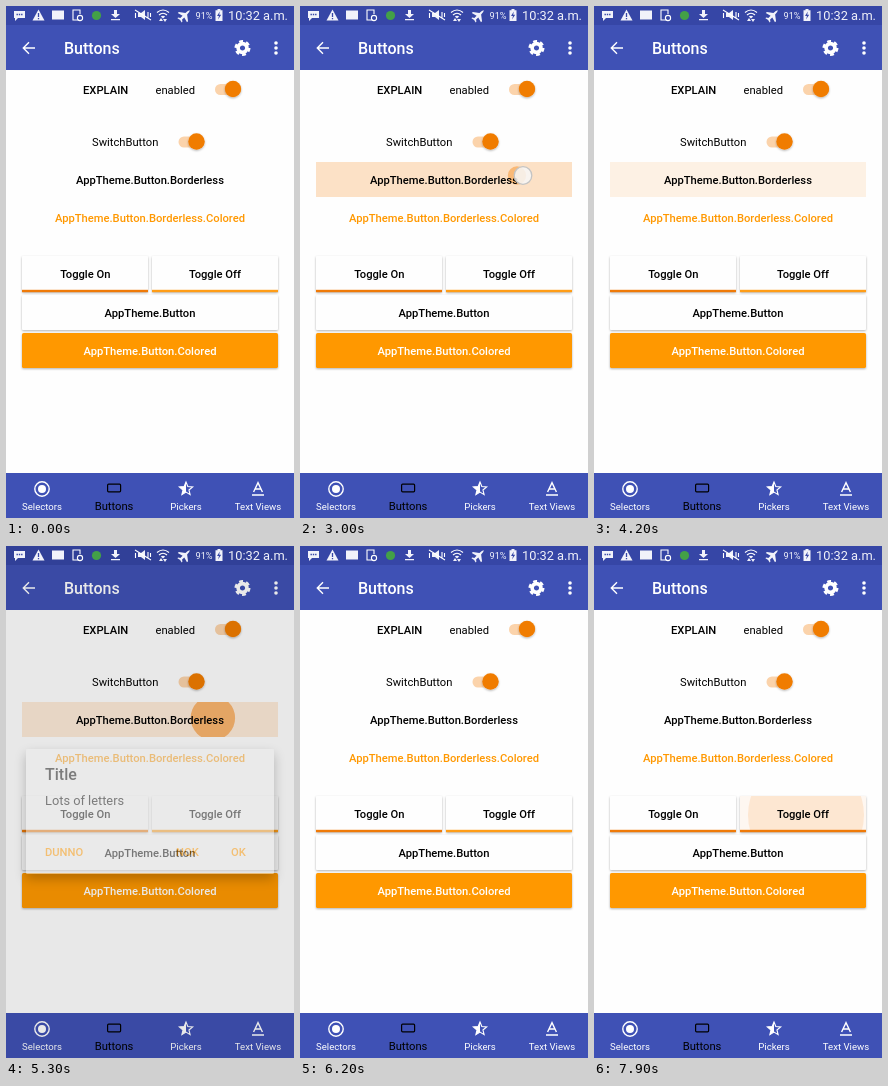
Write an HTML page that moves like this. It is 288 by 512 pixels and loops after 8000 ms.

```html
<!DOCTYPE html>
<html lang="en">
<head>
<meta charset="utf-8">
<title>Buttons</title>
<style>
html, body { margin: 0; width: 100%; height: 100%; overflow: hidden; background: #fefefe; }
svg { display: block; width: 288px; height: 512px; }
text { font: 11.2px Roboto, "Open Sans", sans-serif; }
.medium { font-weight: 500; }
.mid { text-anchor: middle; }
.title { font-size: 16px; font-weight: 500; }
.nav { font-size: 9.6px; fill: #fff; text-anchor: middle; }
.accent { fill: #ff9800; }
.line { fill: none; stroke: #fff; stroke-width: 1.4; }
</style>
</head>
<body>
<svg viewBox="0 0 288 512" xmlns="http://www.w3.org/2000/svg">
  <defs>
    <filter id="raised" x="-10%" y="-20%" width="120%" height="150%">
      <feDropShadow dx="0" dy="1" stdDeviation="0.9" flood-opacity=".3"/>
    </filter>
    <filter id="floating" x="-20%" y="-20%" width="140%" height="150%">
      <feDropShadow dx="0" dy="5" stdDeviation="6" flood-opacity=".45"/>
    </filter>
    <clipPath id="rowClip"><rect x="16" y="156" width="256" height="35"/></clipPath>
    <clipPath id="toggleClip"><rect x="146" y="250" width="126" height="36"/></clipPath>
    <g id="switch">
      <rect x="-18" y="-5" width="26" height="11" rx="5.5" fill="#fbd3ab"/>
      <circle r="8.2" fill="#f07c04" filter="url(#raised)"/>
    </g>
  </defs>

  <rect width="288" height="512" fill="#fefefe"/>
  <rect width="288" height="64" fill="#3f51b5"/>
  <rect width="288" height="19" fill="#3646a6"/>

  <path class="line" d="M29 42H17.5M23 36.3L17.3 42L23 47.7"/>
  <text class="title" x="58" y="48" fill="#fff">Buttons</text>
  <g transform="translate(236.5 42)" fill="none" stroke="#fff">
    <circle r="4.4" stroke-width="3.6"/>
    <circle r="6.8" stroke-width="2.4" stroke-dasharray="3.9 3.22"/>
  </g>
  <g fill="#fff"><circle cx="270" cy="37" r="1.8"/><circle cx="270" cy="42" r="1.8"/><circle cx="270" cy="47" r="1.8"/></g>

  <text class="medium" x="77" y="88">EXPLAIN</text>
  <text x="149.5" y="88">enabled</text>
  <use href="#switch" x="227" y="83"/>
  <text x="86" y="140">SwitchButton</text>
  <use href="#switch" x="190.5" y="135.5"/>

  <g clip-path="url(#rowClip)" fill="#f57c00">
    <rect id="rowTint" x="16" y="156" width="256" height="35"/>
    <circle id="rowRipple"/>
  </g>
  <text class="medium mid" x="144" y="178">AppTheme.Button.Borderless</text>
  <text class="medium mid accent" x="144" y="216">AppTheme.Button.Borderless.Colored</text>

  <g fill="#fefefe" filter="url(#raised)">
    <rect x="16" y="250" width="126" height="36" rx="1"/>
    <rect x="146" y="250" width="126" height="36" rx="1"/>
    <rect x="16" y="289" width="256" height="35" rx="1.6"/>
    <rect class="accent" x="16" y="327" width="256" height="35" rx="1.6"/>
  </g>
  <g clip-path="url(#toggleClip)" fill="#f57c00">
    <rect id="toggleTint" x="146" y="250" width="126" height="36"/>
    <circle id="toggleRipple"/>
  </g>
  <rect x="16" y="283.8" width="126" height="2.4" fill="#ef7a08"/>
  <rect id="toggleLine" x="146" y="283.8" width="126" height="2.4"/>
  <text class="medium mid" x="79.3" y="272">Toggle On</text>
  <text class="medium mid" x="209" y="272">Toggle Off</text>
  <text class="medium mid" x="144" y="311">AppTheme.Button</text>
  <text class="medium mid" x="144" y="349" fill="#fff">AppTheme.Button.Colored</text>

  <rect y="467" width="288" height="45" fill="#3f51b5"/>
  <circle class="line" cx="36" cy="483" r="7.2"/>
  <circle cx="36" cy="483" r="4" fill="#fff"/>
  <rect x="101.6" y="478.2" width="13" height="7.6" rx="1" fill="none" stroke="#000" stroke-width="1.2"/>
  <g transform="translate(180 483)">
    <path id="star" class="line" style="stroke-width:1.1"/>
    <path d="M0-7L-1.9-2.4L-6.7-2.2L-3 .9L-4.1 5.7L0 3.1Z" fill="#fff"/>
  </g>
  <path class="line" d="M247.6 486L252 476.7L256.4 486M249.2 483H254.8M246 489H258"/>
  <text class="nav" x="36" y="504">Selectors</text>
  <text class="mid" x="108" y="504">Buttons</text>
  <text class="nav" x="180" y="504">Pickers</text>
  <text class="nav" x="252" y="504">Text Views</text>

  <rect id="dim" width="288" height="512"/>

  <g fill="#f1f2fa">
    <path d="M8 5H19V12H12L9 15V12H8Z"/>
    <path d="M10.5 8.5H16.5" stroke="#3646a6" stroke-width="1.4" stroke-dasharray="1.4 .9"/>
    <path d="M32.5 3.5L38.5 14.5H26.5Z"/>
    <path d="M32.5 7V11M32.5 12V13.3" stroke="#3646a6" stroke-width="1.3"/>
    <rect x="46" y="4.5" width="12" height="9"/>
    <path class="line" style="stroke-width:1.1" d="M73 14H67V4H74V8"/>
    <circle class="line" style="stroke-width:1.1" cx="74" cy="12" r="2.6"/>
    <circle cx="90.5" cy="9.5" r="4.6" fill="#43a047"/>
    <path d="M108 4H111V8H114L109.5 12L105 8H108ZM105 13H114V14.3H105Z"/>
    <path d="M132 7H135L139 4V14L135 11H132Z"/>
    <path class="line" style="stroke-width:1.1" d="M129 4L145 14M129.5 7V12M142 6V12M144.5 7V11"/>
    <path class="line" style="stroke-width:1.2" d="M151 6.5Q157 1.5 163 6.5M153 9Q157 5.5 161 9"/>
    <path d="M154.8 10.5Q157 8.8 159.2 10.5L157 12.5Z"/>
    <path id="traffic" d="M153 15L155 12L157 15ZM157 13H161L159 16Z"/>
    <path transform="translate(178.5 9.5) rotate(45)" d="M0-7.5Q1.2-6.5 1.2-2.5L6.5 1.5V3L1.2 1.5V4.6L3 6V7L0 6.2L-3 7V6L-1.2 4.6V1.5L-6.5 3V1.5L-1.2-2.5Q-1.2-6.5 0-7.5Z"/>
    <text x="189.5" y="13" style="font-size:9.2px">91%</text>
    <path d="M211.5 3H214.5V4.3H216.5V15H209.5V4.3H211.5Z"/>
    <path d="M213.8 5.5L211 10H213L212 13.5L215.2 8.7H213.2Z" fill="#3646a6"/>
    <text x="222" y="14" style="font-size:12.8px">10:32 a.m.</text>
  </g>

  <g id="dialog">
    <rect x="20" y="203" width="248" height="125" rx="1.6" fill="#ececec" filter="url(#floating)"/>
    <text class="title" x="39" y="234" fill="#151515">Title</text>
    <text x="39" y="259" style="font-size:12.8px" fill="#151515">Lots of letters</text>
    <g class="accent">
      <text class="medium" x="39" y="310">DUNNO</text>
      <text class="medium" x="170" y="310">NOK</text>
      <text class="medium" x="225" y="310">OK</text>
    </g>
  </g>

  <circle id="pointer" r="8.8" fill="#f7f7f7" fill-opacity=".85" stroke="#c4c4c4" stroke-width="1.3"/>
</svg>
<script>
const LOOP = 8000;
const el = Object.fromEntries([...document.querySelectorAll("[id]")].map(n => [n.id, n]));
const set = (node, attrs) => { for (const k in attrs) node.setAttribute(k, attrs[k]); };
const ramp = (t, a, b) => Math.min(1, Math.max(0, (t - a) / (b - a)));
const mix = (a, b, k) => a + (b - a) * k;
// Fades in over a..b and out over c..d.
const pulse = (t, a, b, c, d) => ramp(t, a, b) * (1 - ramp(t, c, d));

const starPoints = Array.from({ length: 10 }, (_, i) => {
  const r = i % 2 ? 3.1 : 7, a = i * Math.PI / 5;
  return `${r * Math.sin(a)} ${-r * Math.cos(a)}`;
});
el.star.setAttribute("d", `M${starPoints.join("L")}Z`);

const touches = [
  { x: 223, y: 169.5, span: [1800, 2000, 3450, 3650] },
  { x: 232.5, y: 305, span: [5600, 5750, 5950, 6100] },
  { x: 212, y: 269, span: [6500, 6700, 7200, 7400] }
];

function rowRipple(t) {
  if (t < 4500) {
    const k = ramp(t, 3000, 3600);
    return { cx: mix(217, 195, k), cy: 169.5, r: mix(2, 9, ramp(t, 1800, 3000)) + 80 * k,
             opacity: .4 * pulse(t, 1900, 2300, 3000, 3500) };
  }
  const k = ramp(t, 5000, 5300), grow = ramp(t, 5300, 5800);
  return { cx: mix(mix(217, 207, k), 144, grow), cy: 172, r: 22 * k + 115 * grow,
           opacity: .5 * pulse(t, 5000, 5100, 5300, 5750) };
}

function rowTint(t) {
  if (t < 3600) return .22 * ramp(t, 2650, 3000);
  if (t < 5000) return mix(.22, .1, ramp(t, 3600, 4200));
  return mix(.1, .15, ramp(t, 5000, 5300)) * (1 - ramp(t, 5300, 5850));
}

function draw(t) {
  set(el.rowTint, { opacity: rowTint(t) });
  set(el.rowRipple, rowRipple(t));

  set(el.toggleTint, { opacity: .05 * ramp(t, 6800, 7300) });
  set(el.toggleRipple, { cx: 212, cy: 269, r: mix(4, 58, ramp(t, 6700, 7900)),
                         opacity: .13 * ramp(t, 6600, 6900) });
  set(el.toggleLine, { fill: t < 7500 ? "#ff9d17" : "#ef7a08" });

  const leave = 1 - ramp(t, 5900, 6200);
  set(el.dim, { opacity: .58 * ramp(t, 5250, 5600) * leave });
  set(el.dialog, { opacity: ramp(t, 5200, 5400) * leave });

  const touch = touches.find(({ span }) => t >= span[0] && t <= span[3]);
  set(el.pointer, touch
    ? { cx: touch.x, cy: touch.y, opacity: pulse(t, ...touch.span) }
    : { opacity: 0 });

  const idle = (t >= 1500 && t < 1600) || (t >= 4600 && t < 4700);
  set(el.traffic, { opacity: idle ? .4 : 1 });
}

const start = performance.now();
function tick() {
  draw((performance.now() - start) % LOOP);
  requestAnimationFrame(tick);
}
tick();
</script>
</body>
</html>
```
